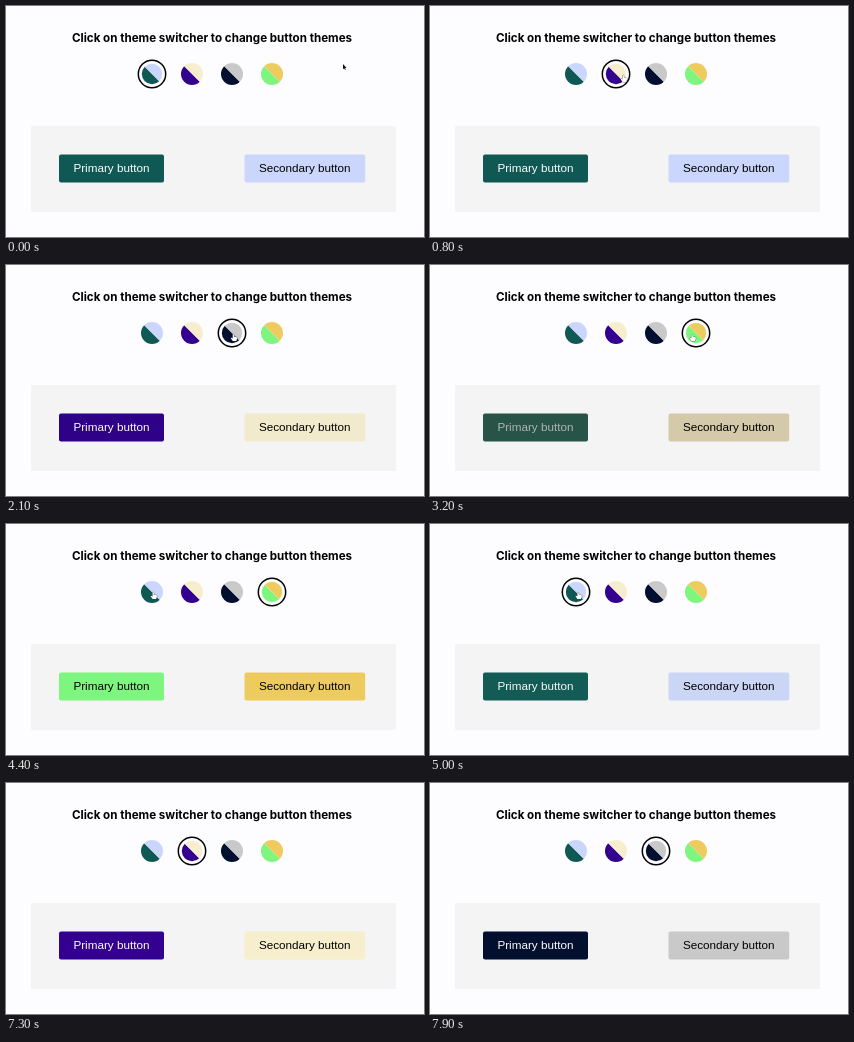
These frames come from a looping animation (418x231 px, 8000 ms). An HTML page with a canvas:

```html
<!DOCTYPE html>
<html lang="en">
<head>
<meta charset="utf-8">
<title>Theme switcher</title>
<style>
html, body { margin: 0; width: 100%; height: 100%; overflow: hidden; background: #fdfcfe; }
canvas { display: block; width: 418px; height: 231px; }
</style>
</head>
<body>
<canvas id="stage"></canvas>
<script>
const W = 418, H = 231, LOOP = 8000, FADE = 500;
const SWATCH_Y = 68, SWATCH_R = 11;
const WHITE = [255, 255, 255], BLACK = [0, 0, 0];

const themes = [
  { x: 146, primary: [16, 88, 84], secondary: [202, 214, 251], text: WHITE },
  { x: 186, primary: [51, 0, 144], secondary: [246, 238, 204], text: WHITE },
  { x: 226, primary: [2, 15, 46], secondary: [201, 201, 201], text: WHITE },
  { x: 266, primary: [126, 245, 126], secondary: [238, 203, 94], text: BLACK }
];

// Each selection: time and theme index.
const picks = [[-FADE, 0], [800, 1], [2050, 2], [3100, 3], [4600, 0], [6650, 1], [7400, 2]];

// Pointer stops: time, x, y.
const path = [
  [0, 337, 58], [150, 337, 58], [650, 193, 69], [1200, 194, 69],
  [1500, 194, 69], [1850, 227, 69], [2500, 228, 69], [2850, 262, 69],
  [3600, 262, 69], [4200, 147, 68], [5000, 148, 68], [5950, 148, 68],
  [6350, 164, 67], [LOOP, 164, 67]
];
const POINTER_HIDES = 6800;

const canvas = document.getElementById('stage');
const ctx = canvas.getContext('2d');
const dpr = window.devicePixelRatio || 1;
canvas.width = Math.round(W * dpr);
canvas.height = Math.round(H * dpr);

const clamp = v => Math.max(0, Math.min(1, v));
const lerp = (a, b, k) => a + (b - a) * k;
const smooth = k => k * k * (3 - 2 * k);
const mix = (a, b, k) => a.map((v, i) => Math.round(lerp(v, b[i], k)));
const rgb = c => `rgb(${c.join(',')})`;

// CSS "ease": cubic-bezier(.25, .1, .25, 1), solved by bisection.
function ease(x) {
  const bezier = (a, b, s) => 3 * a * s * (1 - s) ** 2 + 3 * b * s * s * (1 - s) + s ** 3;
  let lo = 0, hi = 1;
  for (let i = 0; i < 20; i++) {
    const mid = (lo + hi) / 2;
    if (bezier(.25, .25, mid) < x) lo = mid; else hi = mid;
  }
  return bezier(.1, 1, lo);
}

function themeAt(t) {
  let i = picks.length - 1;
  while (picks[i][0] > t) i--;
  const [start, selected] = picks[i];
  const from = themes[picks[Math.max(0, i - 1)][1]], to = themes[selected];
  const k = ease(clamp((t - start) / FADE));
  const blend = key => rgb(mix(from[key], to[key], k));
  return { selected, primary: blend('primary'), secondary: blend('secondary'), text: blend('text') };
}

function pointerAt(t) {
  let i = 1;
  while (i < path.length - 1 && path[i][0] < t) i++;
  const a = path[i - 1], b = path[i];
  const k = smooth(clamp((t - a[0]) / (b[0] - a[0])));
  return [lerp(a[1], b[1], k), lerp(a[2], b[2], k)];
}

function label(text, x, y, font, color, align) {
  ctx.font = font;
  ctx.fillStyle = color;
  ctx.textAlign = align;
  ctx.fillText(text, x, y);
}

function button(text, x, w, fill, color) {
  ctx.fillStyle = fill;
  ctx.beginPath();
  ctx.roundRect(x, 148.6, w, 28, 2);
  ctx.fill();
  label(text, x + 14.4, 166.2, '11.7px "Liberation Sans", Arial, sans-serif', color, 'left');
}

function swatch(theme, selected) {
  const r = selected ? 10.2 : SWATCH_R;
  const half = (color, start) => {
    ctx.fillStyle = rgb(color);
    ctx.beginPath();
    ctx.arc(theme.x, SWATCH_Y, r, start, start + Math.PI);
    ctx.fill();
  };
  half(theme.primary, Math.PI / 4);
  half(theme.secondary, -Math.PI * 3 / 4);
  if (!selected) return;
  ctx.strokeStyle = '#000';
  ctx.lineWidth = 1.5;
  ctx.beginPath();
  ctx.arc(theme.x, SWATCH_Y, 13.7, 0, Math.PI * 2);
  ctx.stroke();
}

function pointer(x, y) {
  const onSwatch = themes.some(s => Math.hypot(x - s.x, y - SWATCH_Y) < SWATCH_R);
  const shape = new Path2D(onSwatch
    ? 'M-.6 .5Q0-.4.6.5V2.6L3.3 3.2Q4 3.5 3.8 4.5L3 7H-.6L-2.5 4.3Q-2.3 3.2-.6 4.4Z'
    : 'M0 0V5.2L1.2 4.2L2 6L2.8 5.6L2 3.9H3.6Z');
  ctx.save();
  ctx.translate(x, y);
  ctx.lineWidth = onSwatch ? .6 : .7;
  ctx.strokeStyle = onSwatch ? '#333' : '#fff';
  ctx.fillStyle = onSwatch ? '#fff' : '#111';
  ctx.stroke(shape);
  ctx.fill(shape);
  ctx.restore();
}

function draw(t) {
  const theme = themeAt(t);
  ctx.setTransform(dpr, 0, 0, dpr, 0, 0);
  ctx.fillStyle = '#fdfcfe';
  ctx.fillRect(0, 0, W, H);
  label('Click on theme switcher to change button themes', 206, 36,
    'bold 11.6px Inter, sans-serif', '#000', 'center');
  themes.forEach((s, i) => swatch(s, i === theme.selected));
  ctx.fillStyle = '#f4f4f5';
  ctx.fillRect(25, 120, 365, 86);
  button('Primary button', 53, 105, theme.primary, theme.text);
  button('Secondary button', 238.5, 120.7, theme.secondary, '#000');
  if (t < POINTER_HIDES) pointer(...pointerAt(t));
}

const began = performance.now();
function tick() {
  draw((performance.now() - began) % LOOP);
  requestAnimationFrame(tick);
}
tick();
</script>
</body>
</html>
```
